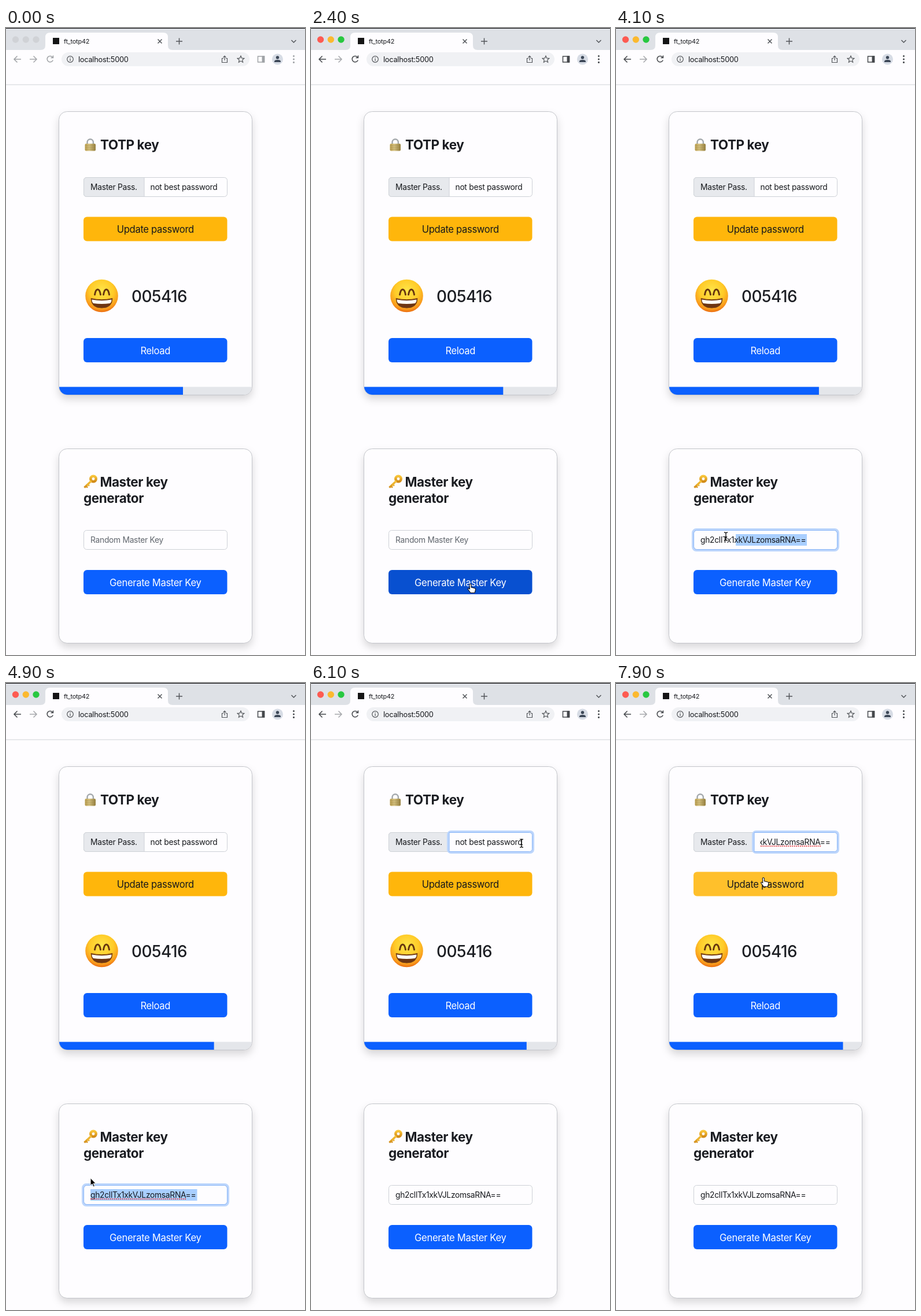
An HTML page that plays this animation: 517 px wide and 1084 px high, repeating every 8 s.

```html
<!DOCTYPE html>
<html lang="en">
<head>
<meta charset="utf-8">
<title>TOTP key</title>
<style>
  html, body { margin: 0; width: 100%; height: 100%; overflow: hidden; background: #fefdff; }
  svg { display: block; width: 517px; height: 1084px; }
  text { font: 13.8px Inter, "Liberation Sans", sans-serif; letter-spacing: -.02em; fill: #16181c; white-space: pre; }
  .title { font-size: 22.5px; font-weight: 700; fill: #1b1d22; }
  .label { font-size: 16.6px; text-anchor: middle; }
  .light { fill: #fff; }
  .code { font-size: 27.8px; font-weight: 500; fill: #1d1f24; }
  .card { fill: #fefdff; stroke: #c3c5ca; filter: drop-shadow(0 7px 7px rgba(0,0,0,.15)); }
  .field { fill: #fefdff; stroke: #cdd1d6; }
  .ring { fill: none; stroke: #bdd6fc; stroke-width: 4; }
  .focus { fill: none; stroke: #86b4f8; }
  .selection { fill: #a9cfff; }
  .spell { stroke: #e5484d; stroke-width: 1.8; stroke-dasharray: 1.8 1.6; }
  .icon { fill: none; stroke: #54575b; stroke-width: 1.5; }
</style>
</head>
<body>
<svg viewBox="0 0 517 1084">
  <defs>
    <radialGradient id="skin" cx=".5" cy=".35" r=".66">
      <stop offset="0" stop-color="#ffe64a"/><stop offset=".55" stop-color="#ffcb28"/>
      <stop offset=".85" stop-color="#f99a1c"/><stop offset="1" stop-color="#e9660f"/>
    </radialGradient>
    <linearGradient id="brass">
      <stop offset="0" stop-color="#b99c4c"/><stop offset=".4" stop-color="#d5c180"/><stop offset="1" stop-color="#96803f"/>
    </linearGradient>
    <linearGradient id="gold" x2="0" y2="1">
      <stop offset="0" stop-color="#f8c53a"/><stop offset="1" stop-color="#d18a18"/>
    </linearGradient>
    <clipPath id="topCard"><rect x="92" y="145" width="333" height="489" rx="14"/></clipPath>
    <clipPath id="passwordClip"><rect x="249.5" y="260" width="122" height="30"/></clipPath>
  </defs>

  <!-- browser window -->
  <rect width="517" height="1084" fill="#fefdff"/>
  <rect width="517" height="38" fill="#dee1e6"/>
  <rect width="517" height="1" fill="#050505"/>
  <g id="lights"><circle cx="16.5" cy="20" r="5.7"/><circle cx="34.3" cy="20" r="5.7"/><circle cx="52" cy="20" r="5.7"/></g>
  <path d="M60 38q8 0 8-8V16q0-8 8-8h196q8 0 8 8v14q0 8 8 8z" fill="#fefdff"/>
  <rect x="81" y="17" width="11" height="11" fill="#151515"/>
  <text x="100" y="26.5" style="font-size:10.9px">ft_totp42</text>
  <path class="icon" d="M262.500 19.500l7 7m0-7l-7 7M294 23h11m-5.500-5.500v11M493.500 21l4 4 4-4"/>
  <rect x="96" y="42" width="325" height="24" rx="12" fill="#f0f1f4"/>
  <g id="tools" class="icon">
    <path d="M26 54H14m5.500-5.500L14 54l5.500 5.500"/>
    <path d="M80.500 50.500a5.200 5.200 0 1 0 .7 5M81.500 47.500v4h-4"/>
    <path d="M435.500 49h11v10h-11zM443.500 49v10" />
    <path d="M443.500 49h3v10h-3z" fill="currentColor"/>
    <path d="M497.500 48.500v.1m0 5.300v.1m0 5.300v.1" stroke-width="3" stroke-linecap="round"/>
  </g>
  <path class="icon" d="M41 54h12m-5.500-5.500L53 54l-5.500 5.500" style="stroke:#a6a8ac"/>
  <g class="icon" style="stroke-width:1.200">
    <circle cx="111" cy="54" r="5.300"/><path d="M111 53v4m0-6.300v1.200"/>
    <path d="M376 52.500h-2.500v7h9v-7H380M378 56v-7.500m-2.500 2.300l2.500-2.500 2.500 2.500"/>
    <path d="M406 48.300l1.700 3.800 4.100.4-3.100 2.700.9 4-3.600-2.100-3.600 2.100.9-4-3.100-2.700 4.100-.4z"/>
  </g>
  <text x="125" y="58.500" style="font-size:12.800px">localhost:5000</text>
  <circle cx="469.500" cy="54" r="9.500" fill="#d7dce5"/>
  <g fill="#3c4757"><circle cx="469.500" cy="51" r="2.700"/><path d="M464 59v-1q0-3 5.500-3t5.500 3v1z"/></g>
  <rect y="97.500" width="517" height="1" fill="#d2d3d8"/>

  <!-- TOTP card -->
  <rect class="card" x="91.500" y="144.500" width="334" height="490" rx="14"/>
  <g clip-path="url(#topCard)">
    <rect x="92" y="620.500" width="334" height="14" fill="#e4e6ea"/>
    <rect id="progress" x="92" y="620.500" height="14" fill="#0b60ff"/>
  </g>
  <path d="M140.500 202v-4.500a5.200 5.200 0 0 1 10.400 0v4.500" fill="none" stroke="#a4a9ac" stroke-width="2.500"/>
  <rect x="136.500" y="200" width="18.500" height="12.500" rx="2" fill="url(#brass)"/>
  <path d="M137 203.500h17.500m-17.500 3h17.500m-17.500 3h17.500" stroke="#8d793d" stroke-width=".6" opacity=".6"/>
  <text class="title" x="163" y="210">TOTP key</text>
  <rect class="field" x="134.500" y="258.500" width="248" height="33" rx="5"/>
  <path d="M239 258.500h-99.500q-5 0-5 5v23q0 5 5 5H239z" fill="#e7e9ed" stroke="#cdd1d6"/>
  <text x="146" y="280">Master Pass.</text>
  <g id="passwordFocus">
    <rect class="ring" x="237" y="257" width="147" height="36" rx="5"/>
    <path d="M239 258.500h138.500q5 0 5 5v23q0 5-5 5H239z" fill="#fefdff" stroke="#86b4f8"/>
  </g>
  <rect id="passwordSelection" class="selection" x="249.500" y="265" width="118" height="20"/>
  <text id="password" x="249.500" y="280">not best password</text>
  <g id="pasted" clip-path="url(#passwordClip)">
    <text x="370.500" y="280" text-anchor="end">gh2cllTx1xkVJLzomsaRNA==</text>
    <path class="spell" d="M250 282h104"/>
  </g>
  <rect id="update" x="134" y="326.500" width="248.500" height="42" rx="6"/>
  <text class="label" x="258.300" y="354">Update password</text>

  <g transform="translate(165.500 463)">
    <circle r="28.300" fill="url(#skin)"/>
    <path d="M-12-2q1.500-9 5-9t5 9m5 0q1.500-9 5-9t5 9" fill="none" stroke="#68370f" stroke-width="3" stroke-linecap="round"/>
    <path d="M-18.500 4.500Q0 9 18.500 4.500Q18 21 0 21T-18.500 4.500z" fill="#6d3512" stroke="#7c4314"/>
    <path d="M-17 6.500Q0 10 17 6.500Q17 11 14.500 13Q0 15-14.500 13Q-17 11-17 6.500z" fill="#fffdf5"/>
  </g>
  <text class="code" x="217" y="473.500">005416</text>
  <rect x="134" y="536" width="248.500" height="42" rx="6" fill="#0b60ff"/>
  <text class="label light" x="258.300" y="563.500">Reload</text>

  <!-- generator card -->
  <rect class="card" x="91.500" y="727.500" width="334" height="336" rx="14"/>
  <g fill="none" stroke="url(#gold)">
    <circle cx="151" cy="779.500" r="4.700" stroke-width="4.500"/>
    <path d="M147.500 783l-12 11.500" stroke-width="3.400"/>
    <path d="M138 791.500l3 3m0-6l3 3" stroke-width="2.500"/>
  </g>
  <text class="title" x="162.500" y="792.500">Master key</text>
  <text class="title" x="134" y="820.500">generator</text>
  <rect class="field" x="134.500" y="868.500" width="248" height="33" rx="5"/>
  <g id="keyFocus">
    <rect class="ring" x="133" y="867" width="251" height="36" rx="6"/>
    <rect class="focus" x="134.500" y="868.500" width="248" height="33" rx="5"/>
  </g>
  <rect id="keySelection" class="selection" y="875" height="20"/>
  <text id="key" x="146" y="890"></text>
  <path id="keySpell" class="spell" d="M146 892h166"/>
  <rect id="generate" x="134" y="937" width="248.500" height="42" rx="6"/>
  <text class="label light" x="258.300" y="964.500">Generate Master Key</text>

  <g id="mouse">
    <path id="arrow" d="M0 0v13l3-2.800 2.200 5 2-.9-2.200-4.800h4z" fill="#000" stroke="#fff" stroke-width=".9"/>
    <path id="hand" d="M-1.500 1q1.500-2 3 0v5l6 1.500q2 .5 1.500 3l-1.500 5h-7l-4.500-6q-.5-2 1.500-1.500l1.500 1z" fill="#fff" stroke="#111" stroke-width="1.100"/>
    <path id="beam" d="M-3-7q3 0 3 2v10q0 2-3 2M3-7q-3 0-3 2m0 10q0 2 3 2M-2 2.500h4" fill="none" stroke="#111" stroke-width="1.300"/>
  </g>
</svg>
<script>
  const LOOP = 8000, STEP = 100;
  const $ = id => document.getElementById(id);
  const show = (id, on) => $(id).style.display = on ? '' : 'none';
  const between = (t, from, to) => t >= from && t < to;

  // time, x, y of the pointer's hot spot
  const path = [
    [400, 292, 983], [1000, 262, 968], [1500, 259, 963], [2000, 273, 961], [2400, 275.5, 961],
    [3500, 275.5, 961], [3800, 332, 884], [4100, 190, 879], [4300, 139, 880], [4800, 139, 880],
    [5600, 304, 316], [6000, 364, 277], [6400, 364, 278], [6900, 318, 283], [7300, 318, 283],
    [7700, 257, 338], [8000, 254, 336]
  ];

  function pointerAt(t) {
    const i = path.findIndex(p => p[0] > t);
    if (i < 1) return path[0].slice(1);
    const [t0, x0, y0] = path[i - 1], [t1, x1, y1] = path[i];
    const u = (t - t0) / (t1 - t0), k = u * u * (3 - 2 * u);
    return [x0 + (x1 - x0) * k, y0 + (y1 - y0) * k];
  }

  function pointerShape(t) {
    if (between(t, 1700, 3600) || t >= 7600) return 'hand';
    if (between(t, 3700, 4900) || between(t, 5900, 7500)) return 'beam';
    return 'arrow';
  }

  function draw(t) {
    const active = t >= 1000;
    const colors = active ? ['#fd5b52', '#fbb92f', '#28c840'] : Array(3).fill('#d0d2d6');
    [...$('lights').children].forEach((dot, i) => dot.setAttribute('fill', colors[i]));
    $('tools').style.stroke = $('tools').style.color = active ? '#46494d' : '#a0a3a7';

    $('progress').setAttribute('width', 214 + t * 0.01095);

    const generated = t >= 2500;
    $('key').textContent = generated ? 'gh2cllTx1xkVJLzomsaRNA==' : 'Random Master Key';
    $('key').style.fill = generated ? '#16181c' : '#60666d';
    $('generate').setAttribute('fill', between(t, 1700, 3700) ? '#0850d0' : '#0b60ff');

    // the selection trails the dragging pointer
    const start = Math.min(330, Math.max(146, pointerAt(t - 65)[0]));
    const keyFocused = between(t, 3800, 6100);
    show('keyFocus', keyFocused);
    show('keySelection', keyFocused);
    $('keySelection').setAttribute('x', t < 4400 ? start : 146);
    $('keySelection').setAttribute('width', t < 4400 ? 330 - start : 184.5);
    show('keySpell', between(t, 4700, 6100));

    const pasted = t >= 7300;
    show('passwordFocus', t >= 6100);
    show('passwordSelection', between(t, 6400, 7300));
    show('password', !pasted);
    show('pasted', pasted);
    $('update').setAttribute('fill', t >= 7600 ? '#ffc02b' : '#ffb60b');

    show('mouse', t >= 400);
    $('mouse').setAttribute('transform', `translate(${pointerAt(t)})`);
    for (const shape of ['arrow', 'hand', 'beam']) show(shape, shape === pointerShape(t));
  }

  const begin = performance.now();
  function tick() {
    const t = (performance.now() - begin) % LOOP;
    draw(Math.floor(t / STEP) * STEP);
    requestAnimationFrame(tick);
  }
  tick();
</script>
</body>
</html>
```
